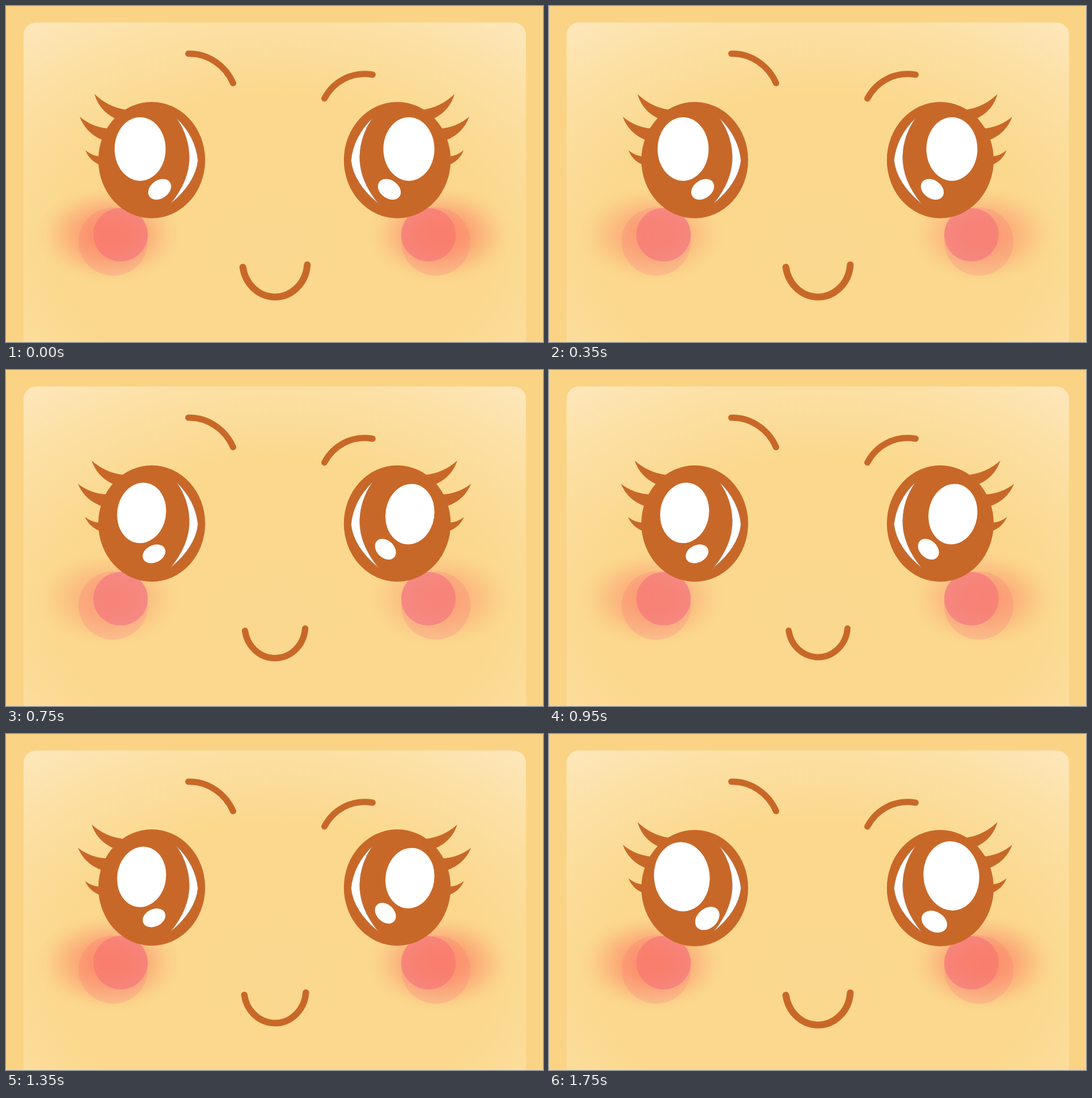
An HTML page with a canvas that plays this animation: 947 by 592 pixels, repeating every 3750 ms.

```html
<!DOCTYPE html>
<html lang="en">
<head>
<meta charset="utf-8">
<title>Shimmering eyes</title>
<style>
html, body { margin: 0; width: 100%; height: 100%; overflow: hidden; background: #fbd385; }
canvas { position: absolute; left: 0; top: 0; }
</style>
</head>
<body>
<canvas id="face" width="947" height="592"></canvas>
<canvas id="eyes" width="947" height="592"></canvas>
<script>
const W = 947, H = 592, LOOP = 3750, BEAT = 200;
const BLINK_START = 200, BLINK_END = 350;
const BROWN = '#c86828';
const EYE = { x: 257, y: 271.5 };
const eyesCanvas = document.getElementById('eyes');
const face = document.getElementById('face').getContext('2d');
const eyes = eyesCanvas.getContext('2d');

const radians = degrees => degrees * Math.PI / 180;

// The face trembles in beats after the blink, then rests with wide highlights.
function stateAt(time) {
  const beat = Math.floor((time - BLINK_END) / BEAT);
  const squint = (beat >= 1 && beat <= 3) || beat === 5;
  const wide = beat >= 7;
  return {
    squint,
    eyeAlpha: time >= BLINK_START && time < BLINK_END ? 0.1 : 1,
    shineTurn: squint ? 9 : wide ? -5.5 : 0,
    shineScale: squint ? 0.955 : wide ? 1.09 : 1,
    pout: squint ? 2 - Math.abs(beat - 3) / 2 : 0,
    glow: Math.min(1, 0.5 + Math.max((beat - 1) / 8, (1 - beat) / 4))
  };
}

function ellipse(c, x, y, rx, ry, fill, degrees = 0) {
  c.fillStyle = fill;
  c.beginPath();
  c.ellipse(x, y, rx, ry, radians(degrees), 0, Math.PI * 2);
  c.fill();
}

function pivot(c, x, y, degrees, scale, draw) {
  c.save();
  c.translate(x, y);
  c.rotate(radians(degrees));
  c.scale(scale, scale);
  draw();
  c.restore();
}

// Calls draw with 1 on the left half and -1 on the mirrored half.
function bothSides(c, draw) {
  draw(1);
  c.save();
  c.translate(W, 0);
  c.scale(-1, 1);
  draw(-1);
  c.restore();
}

function drawCard() {
  face.fillStyle = '#fbd385';
  face.fillRect(0, 0, W, H);
  face.save();
  face.beginPath();
  face.roundRect(31, 29, 886, 700, 22);
  face.clip();
  face.translate(474, 420);
  face.scale(620, 420);
  const light = face.createRadialGradient(0, 0, 0, 0, 0, 1.2);
  light.addColorStop(0, '#fbd88f');
  light.addColorStop(0.52, '#fbd88d');
  light.addColorStop(0.78, '#fce0a4');
  light.addColorStop(1, '#fde8be');
  face.fillStyle = light;
  face.fillRect(-1, -1, 2, 2);
  face.restore();
}

function drawCheek(glow) {
  ellipse(face, 189, 415, 61, 60, 'rgba(244,140,140,0.3)');
  ellipse(face, 202, 403, 48, 47, '#f38e8e');
  face.save();
  face.translate(182, 403);
  face.scale(128, 86);
  const blush = face.createRadialGradient(0, 0, 0, 0, 0, 1);
  for (let r = 0; r <= 1; r += 0.125) {
    blush.addColorStop(r, `rgba(252,118,92,${0.7 * glow * (1 - r * r) ** 1.8})`);
  }
  ellipse(face, 0, 0, 1, 1, blush);
  face.restore();
}

function drawBrows() {
  face.strokeStyle = BROWN;
  face.lineCap = 'round';
  face.lineWidth = 11;
  face.beginPath();
  face.moveTo(321.5, 84);
  face.bezierCurveTo(356, 83, 387, 105, 400.5, 136);
  face.moveTo(561.5, 163);
  face.bezierCurveTo(577, 134, 608, 115, 646.5, 121);
  face.stroke();
}

function drawMouth(pout) {
  const top = 451;
  face.lineWidth = 12 - pout / 2;
  face.beginPath();
  face.ellipse(474.3, top, 57.2 - 2.5 * pout, 61.7 - 3.4 * pout, 0, 0.08, Math.PI - 0.15);
  face.stroke();
}

// Curves to a point, sagging sideways in proportion to the distance.
function sagTo(x0, y0, x1, y1, sag) {
  eyes.quadraticCurveTo(
    (x0 + x1) / 2 - (y1 - y0) * sag,
    (y0 + y1) / 2 + (x1 - x0) * sag,
    x1, y1);
}

function drawLash(tipX, tipY, upX, upY, lowX, lowY) {
  eyes.beginPath();
  eyes.moveTo(tipX, tipY);
  sagTo(tipX, tipY, upX, upY, 0.16);
  eyes.lineTo(upX + 12, upY + 14);
  eyes.lineTo(lowX, lowY);
  sagTo(lowX, lowY, tipX, tipY, -0.22);
  eyes.fill();
}

function drawLashes() {
  eyes.translate(-EYE.x, -EYE.y);
  drawLash(156, 155, 212, 183, 192, 198);
  drawLash(130, 195, 181, 216, 170, 236);
  drawLash(140, 254, 165, 265, 166, 280);
}

function drawCrescent() {
  eyes.beginPath();
  eyes.moveTo(301, 198);
  eyes.quadraticCurveTo(334, 230, 338.5, 272);
  eyes.quadraticCurveTo(334, 312, 290.5, 348);
  eyes.quadraticCurveTo(324, 307, 323.3, 265);
  eyes.quadraticCurveTo(322.5, 229, 301, 198);
  eyes.fillStyle = '#fff';
  eyes.fill();
  eyes.lineWidth = 1;
  eyes.strokeStyle = 'rgba(170,130,110,0.6)';
  eyes.stroke();
}

function drawShine() {
  ellipse(eyes, -7.3, -15, 45, 56, '#fff');
  ellipse(eyes, 27.2, 56, 22, 16, '#fff', -35);
}

function drawEye(side, { squint, shineTurn, shineScale }) {
  ellipse(eyes, EYE.x, EYE.y - (squint ? 1 : 0), 94.2, 102.5, BROWN);
  pivot(eyes, EYE.x, EYE.y, squint ? -2.5 : 0, 1, drawLashes);
  drawCrescent();
  // Both highlights turn the same way on screen, so undo the mirroring.
  pivot(eyes, 243.8, 267, shineTurn * side, shineScale, drawShine);
}

function render(state) {
  drawCard();
  bothSides(face, () => drawCheek(state.glow));
  drawBrows();
  drawMouth(state.pout);

  eyes.clearRect(0, 0, W, H);
  bothSides(eyes, side => drawEye(side, state));
  // The eye layer fades as a whole, so highlights do not mix with the iris.
  eyesCanvas.style.opacity = state.eyeAlpha;
}

const start = performance.now();
function tick() {
  render(stateAt((performance.now() - start) % LOOP));
  requestAnimationFrame(tick);
}
tick();
</script>
</body>
</html>
```
